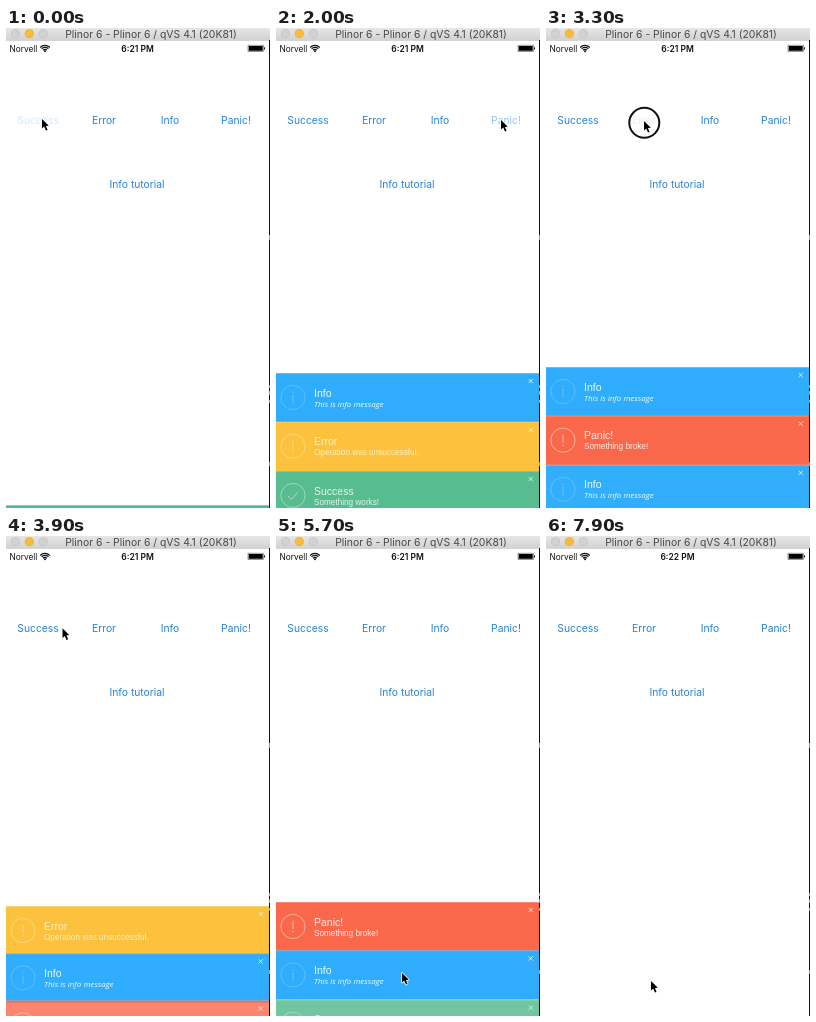
An HTML page with a canvas for the animation above (8000 ms loop, 264x480 px).

```html
<!DOCTYPE html>
<html lang="en">
<head>
<meta charset="utf-8">
<title>Banner stack</title>
<style>
html, body { margin: 0; width: 100%; height: 100%; overflow: hidden; background: #fff; }
canvas { display: block; width: 264px; height: 480px; }
</style>
</head>
<body>
<canvas id="stage"></canvas>
<script>
const W = 264, H = 480, LOOP = 8000, STEP = 100;
const ROW = 49.2, FALL = 400;
const UI = 'Inter, "Liberation Sans", sans-serif';
const PLAIN = '"Liberation Sans", Arial, sans-serif';
const canvas = document.getElementById('stage');
const dpr = window.devicePixelRatio || 1;
canvas.width = W * dpr;
canvas.height = H * dpr;
const ctx = canvas.getContext('2d');

const KINDS = {
  success: { color: '#50b98c', title: 'Success', text: 'Something works!', ink: 0.88, icon: 0.6 },
  error: { color: '#fcc23d', title: 'Error', text: 'Operation was unsuccessful.', ink: 0.68, icon: 0.45 },
  info: { color: '#2fadfc', title: 'Info', text: 'This is info message', ink: 0.92, icon: 0.3 },
  panic: { color: '#fa684c', title: 'Panic!', text: 'Something broke!', ink: 0.88, icon: 0.65 }
};

const BUTTONS = [
  { label: 'Success', x: 32, y: 92, presses: [-120, 4250] },
  { label: 'Error', x: 98, y: 92, presses: [550, 3300] },
  { label: 'Info', x: 164, y: 92, presses: [1200, 2500, 4780] },
  { label: 'Panic!', x: 230, y: 92, presses: [1800, 5000] },
  { label: 'Info tutorial', x: 131, y: 156, presses: [] }
];

// kind, time it rises, time it drops out
const BANNERS = [
  ['success', -8, 1870], ['error', 620, 2450], ['info', 1290, 3212],
  ['panic', 2030, 3650], ['info', 2600, 3850], ['error', 3320, 4050],
  ['success', 4300, 5454], ['info', 4820, 5850], ['panic', 5020, 6150]
];

// time, x, y of the pointer tip
const PATH = [
  [0, 36, 91], [150, 36, 91], [500, 97, 92], [720, 97, 92],
  [1150, 163, 92], [1350, 163, 92], [1750, 225, 92], [2050, 225, 92],
  [2450, 163, 92], [2700, 163, 92], [3200, 98, 93], [3450, 98, 93],
  [4200, 34, 92], [4330, 34, 92], [4600, 110, 255], [4780, 163, 92],
  [4860, 163, 92], [5000, 226, 92], [5100, 226, 92], [5700, 126, 437],
  [5950, 126, 437], [6700, 132, 177], [6950, 132, 177], [7900, 105, 445]
];

const clamp = v => Math.max(0, Math.min(1, v));
const smooth = p => p * p * (3 - 2 * p);
const white = a => `rgba(255,255,255,${a})`;

function label(str, x, y, font, color, align = 'left') {
  ctx.font = font;
  ctx.fillStyle = color;
  ctx.textAlign = align;
  ctx.textBaseline = 'alphabetic';
  ctx.fillText(str, x, y);
}

function circle(x, y, r) {
  ctx.beginPath();
  ctx.arc(x, y, r, 0, Math.PI * 2);
}

function line(points) {
  ctx.beginPath();
  points.forEach(([x, y], i) => i ? ctx.lineTo(x, y) : ctx.moveTo(x, y));
}

function drawTitleBar() {
  const shade = ctx.createLinearGradient(0, 0, 0, 12);
  shade.addColorStop(0, '#e6e6e6');
  shade.addColorStop(1, '#d2d2d2');
  ctx.fillStyle = shade;
  ctx.fillRect(0, 0, W, 12);
  ctx.fillStyle = '#b9b9b9';
  ctx.fillRect(0, 12, W, 0.6);
  [[9.5, '#d2d2d2', '#bcbcbc'], [23.3, '#f8bd35', '#dfa32c'], [37.3, '#d2d2d2', '#bcbcbc']].forEach(([x, fill, rim]) => {
    circle(x, 5.6, 4.1);
    ctx.fillStyle = fill;
    ctx.fill();
    ctx.strokeStyle = rim;
    ctx.lineWidth = 0.6;
    ctx.stroke();
  });
  label('Plinor 6 - Plinor 6 / qVS 4.1 (20K81)', 145, 9.5, `10.4px ${UI}`, '#484848', 'center');
}

function drawStatusBar(t) {
  label('Norvell', 3.5, 23.6, `8.3px ${UI}`, '#111');
  ctx.strokeStyle = '#111';
  ctx.lineWidth = 1.2;
  [2.6, 4.7, 6.6].forEach(r => {
    ctx.beginPath();
    ctx.arc(39, 24, r, -Math.PI * 0.76, -Math.PI * 0.24);
    ctx.stroke();
  });
  circle(39, 23.2, 1);
  ctx.fillStyle = '#111';
  ctx.fill();
  label(t < 6200 ? '6:21 PM' : '6:22 PM', 131.5, 23.6, `600 8.5px ${UI}`, '#111', 'center');
  ctx.strokeStyle = '#333';
  ctx.lineWidth = 0.5;
  ctx.strokeRect(242, 17.3, 15.4, 6.2);
  ctx.fillStyle = '#000';
  ctx.fillRect(242.7, 18, 14, 4.8);
  ctx.fillRect(258, 19.3, 0.9, 2.2);
}

function drawButtons(t) {
  BUTTONS.forEach(({ label: name, x, y, presses }) => {
    const last = presses.filter(p => p <= t).pop();
    const alpha = last === undefined ? 1 : 0.12 + 0.88 * clamp((t - last - 100) / 250);
    ctx.globalAlpha = alpha;
    label(name, x, y + 3.7, `10.3px ${UI}`, '#2583d9', 'center');
    ctx.globalAlpha = 1;
  });
}

function drawIcon(name, y) {
  circle(17, y, 12.1);
  ctx.lineWidth = 0.7;
  ctx.stroke();
  ctx.lineWidth = 0.9;
  if (name === 'success') {
    line([[11.8, y + 0.3], [15.4, y + 3.7], [22.2, y - 3.6]]);
    ctx.stroke();
    return;
  }
  const flip = name === 'info' ? -1 : 1;
  line([[17, y - 5.8 * flip], [17, y + 2.6 * flip]]);
  ctx.stroke();
  circle(17, y + 5.2 * flip, 0.7);
  ctx.fill();
}

function drawBanner(name, y, alpha) {
  const kind = KINDS[name];
  ctx.globalAlpha = alpha;
  ctx.fillStyle = kind.color;
  ctx.fillRect(0, y, 263, ROW);
  ctx.fillStyle = white(0.3);
  ctx.fillRect(0, y, 263, 0.7);
  ctx.strokeStyle = ctx.fillStyle = white(kind.icon);
  drawIcon(name, y + 24.5);
  label(kind.title, 38, y + 23.6, `10.5px ${PLAIN}`, white(kind.ink));
  const font = name === 'info' ? 'italic 8px "Open Sans", sans-serif' : `8.2px ${PLAIN}`;
  label(kind.text, 38, y + 33.6, font, white(kind.ink));
  ctx.strokeStyle = white(0.85);
  ctx.lineWidth = 0.9;
  [-1, 1].forEach(s => {
    line([[252.6, y + 8 - 2.1 * s], [256.8, y + 8 + 2.1 * s]]);
    ctx.stroke();
  });
  ctx.globalAlpha = 1;
}

function drawBanners(t) {
  let level = 0;
  const shown = [];
  BANNERS.forEach(([name, start, end]) => {
    const p = clamp((t - end) / FALL);
    if (t < start || p === 1) return;
    level += 1 - smooth(p);
    const s = (t - start) / 1000;
    const rise = 1 - Math.exp(-7 * s) * Math.cos(Math.PI * s / 0.3);
    shown.unshift([name, H - ROW * level * rise, 1 - 0.5 * p * p]);
  });
  shown.forEach(b => drawBanner(...b));
}

function drawEdge() {
  ctx.fillStyle = '#111';
  ctx.fillRect(263, 12, 1, H - 12);
  ctx.fillStyle = '#999';
  [[207, 5], [357, 3], [363, 4], [372, 3], [434, 4]].forEach(([y, h]) => ctx.fillRect(263, y, 1, h));
}

function pointerAt(t) {
  const i = Math.max(1, PATH.findIndex(k => k[0] >= t));
  const [t0, x0, y0] = PATH[i - 1], [t1, x1, y1] = PATH[i];
  const p = smooth(clamp((t - t0) / (t1 - t0)));
  return [x0 + (x1 - x0) * p, y0 + (y1 - y0) * p];
}

function drawPointer(t) {
  const [x, y] = pointerAt(t);
  const down = BUTTONS.some(b => b.presses.some(p => t >= p && t < p + 100));
  if (down) {
    circle(x + 0.3, y + 1.8, 15);
    ctx.strokeStyle = '#111';
    ctx.lineWidth = 2;
    ctx.stroke();
  }
  line([[0, 0], [0, 9.6], [2.2, 7.6], [4, 11.6], [5.6, 10.9], [3.9, 7], [6.8, 6.8]].map(([a, b]) => [x + a, y + b]));
  ctx.closePath();
  ctx.lineJoin = 'round';
  ctx.strokeStyle = white(0.9);
  ctx.lineWidth = 1.5;
  ctx.stroke();
  ctx.fillStyle = '#000';
  ctx.fill();
}

function draw(t) {
  ctx.setTransform(dpr, 0, 0, dpr, 0, 0);
  ctx.fillStyle = '#fff';
  ctx.fillRect(0, 0, W, H);
  drawTitleBar();
  drawStatusBar(t);
  drawButtons(t);
  drawBanners(t);
  drawEdge();
  drawPointer(t);
}

const origin = performance.now();
function tick() {
  const t = (performance.now() - origin) % LOOP;
  draw(Math.floor(t / STEP) * STEP);
  requestAnimationFrame(tick);
}
tick();
</script>
</body>
</html>
```
